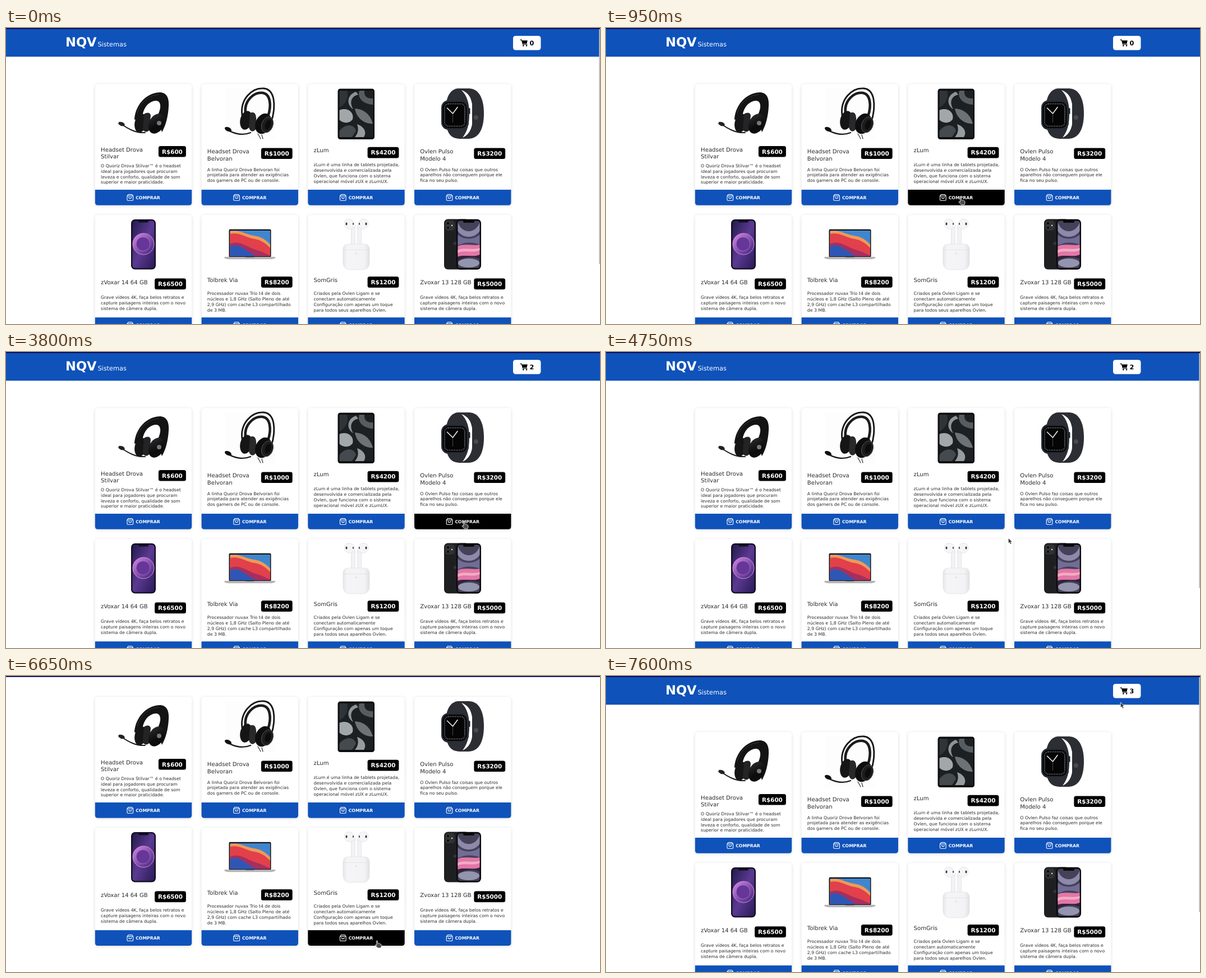
An HTML page that plays this animation: 1059 by 529 pixels, repeating every 8000 ms.

```html
<!DOCTYPE html>
<html lang="pt-BR">
<head>
<meta charset="utf-8">
<title>Loja</title>
<style>
html, body { margin: 0; width: 100%; height: 100%; overflow: hidden; background: #fff; }
svg { display: block; width: 1059px; height: 529px; }
text { font-family: "DejaVu Sans", sans-serif; text-rendering: geometricPrecision; white-space: pre; }
.title { font-size: 10.08px; fill: #2c2c2c; }
.desc { font-size: 7.77px; fill: #2c2c2c; }
.price { font-size: 10.4px; font-weight: bold; fill: #fff; text-anchor: middle; }
.buy { font-size: 7.72px; font-weight: bold; fill: #fff; }
.card { filter: drop-shadow(0 1px 2.5px rgba(0, 0, 0, .15)); }
.line { fill: none; stroke-linecap: round; stroke-linejoin: round; }
</style>
</head>
<body>
<svg viewBox="0 0 1059 529">
  <defs>
    <linearGradient id="violet" x1="0" y1="0" x2="1" y2="1">
      <stop offset="0" stop-color="#241b4c"/><stop offset=".5" stop-color="#5b3a92"/><stop offset="1" stop-color="#2a1a58"/>
    </linearGradient>
    <linearGradient id="orb" x1="0" y1="0" x2="1" y2="1">
      <stop offset="0" stop-color="#d78be6"/><stop offset="1" stop-color="#3b1f78"/>
    </linearGradient>
    <linearGradient id="shell" x1="0" y1="0" x2="1" y2="0">
      <stop offset="0" stop-color="#e6e6ea"/><stop offset=".15" stop-color="#f5f5f7"/><stop offset=".8" stop-color="#f3f3f5"/><stop offset="1" stop-color="#e2e2e6"/>
    </linearGradient>
    <linearGradient id="cup" x1="0" y1="0" x2="1" y2="1">
      <stop offset="0" stop-color="#303032"/><stop offset=".6" stop-color="#0c0c0d"/>
    </linearGradient>
    <clipPath id="tabletScreen"><rect x="594.5" y="112" width="60" height="83"/></clipPath>
    <clipPath id="laptopScreen"><rect x="399.5" y="362" width="71.5" height="46"/></clipPath>
    <clipPath id="phoneScreen"><rect x="805.5" y="344.5" width="39" height="84.5" rx="4"/></clipPath>
  </defs>

  <g id="page">
    <rect y="1" width="1059" height="50.3" fill="#0f52ba"/>
    <g fill="#fff">
      <text x="106" y="32.5" font-size="22.6" font-weight="bold">NQV</text>
      <text x="163.4" y="32.7" font-size="11.3">Sistemas</text>
    </g>
    <rect x="904" y="14" width="49.5" height="25.5" rx="4.5" fill="#fff"/>
    <path d="M917 21.2h2.2l2.4 8h7.2" class="line" stroke="#000" stroke-width="1.2"/>
    <path d="M919.6 22.2h10.2l-1.3 5.6h-7.4z"/>
    <circle cx="922.3" cy="31.5" r="1.3"/><circle cx="928" cy="31.5" r="1.3"/>
    <text id="count" x="933.4" y="31" font-size="11.3" font-weight="bold">0</text>

    <g id="cards"></g>

    <!-- closed headset -->
    <g>
      <path d="M229 164C230 139 249 116 274 115C287 115 291 126 290 140C289 158 285 174 278 186L268 160C277 146 278 131 268 130C254 130 244 144 243 160Z" fill="#141415"/>
      <path d="M234 153C238 135 253 120 272 119" class="line" stroke="#363638" stroke-width="1"/>
      <ellipse cx="240" cy="170" rx="10.5" ry="17" fill="#161617" transform="rotate(12 240 170)"/>
      <path d="M246 154C252 150 258 151 258 157L255 183C250 188 244 185 244 179Z" fill="#242426"/>
      <ellipse cx="268" cy="171" rx="13" ry="18.5" fill="url(#cup)" transform="rotate(26 268 171)"/>
      <circle cx="273" cy="170" r="4" fill="#777"/>
      <path d="M248 187C232 188 219 181 206 172" class="line" stroke="#1a1a1b" stroke-width="2"/>
      <ellipse cx="206" cy="171.5" rx="6" ry="3.4" fill="#222" transform="rotate(20 206 171.5)"/>
    </g>

    <!-- open headset -->
    <g>
      <rect x="390" y="107" width="90" height="92" fill="#fdfdfd"/>
      <path d="M421 156C417 128 438 106 460 108C479 110 482 138 473 168" class="line" stroke="#151516" stroke-width="2.8"/>
      <path d="M427 152C424 130 442 114 458 116C471 118 474 138 467 158" class="line" stroke="#1c1c1e" stroke-width="4.6"/>
      <ellipse cx="428" cy="165" rx="10.5" ry="17" fill="#151516" transform="rotate(12 428 165)"/>
      <path d="M435 152C446 147 448 159 445 181C440 188 434 184 433 177Z" fill="#29292b"/>
      <ellipse cx="459" cy="171" rx="14" ry="19" fill="#0e0e0f" transform="rotate(24 459 171)"/>
      <ellipse cx="466" cy="173" rx="10" ry="14.5" fill="#1d1d1f" stroke="#55555a" stroke-width=".9" transform="rotate(20 466 173)"/>
      <ellipse cx="467" cy="173" rx="5" ry="9" fill="#0c0c0d" transform="rotate(20 467 173)"/>
      <path d="M436 187C422 193 405 189 394 181" class="line" stroke="#1c1c1d" stroke-width="2.4"/>
      <ellipse cx="396" cy="181" rx="6.5" ry="3.6" fill="#111" transform="rotate(27 396 181)"/>
      <path d="M449 189l5 9M456 191l2 7" class="line" stroke="#333" stroke-width="1.2"/>
    </g>

    <!-- tablet -->
    <g>
      <rect x="591.5" y="108.5" width="65.5" height="90.5" rx="4.5" fill="#0c0e10"/>
      <g clip-path="url(#tabletScreen)">
        <path d="M594 112h61v83h-61z" fill="#1c2023"/>
        <path d="M594 112h14C611 123 607 136 594 142Z" fill="#2f3438"/>
        <path d="M624 114C608 119 606 137 619 145C612 133 615 122 628 119Z" fill="#8d9396"/>
        <path d="M630 112C626 124 635 136 655 137V126C643 127 638 121 639 112Z" fill="#565c60"/>
        <path d="M594 147C608 141 621 150 618 163C612 172 600 170 594 164Z" fill="#a2a7aa"/>
        <path d="M622 144C637 145 649 153 654 171C640 172 625 162 622 144Z" fill="#6c7276"/>
        <path d="M594 185C604 170 621 171 624 184L617 195H594Z" fill="#444a4e"/>
        <path d="M626 172C638 176 644 186 638 195H622C628 188 629 181 626 172Z" fill="#979c9f"/>
      </g>
    </g>

    <!-- watch -->
    <g>
      <path d="M785 133C787 121 793 109 806 108H826C846 109 852 131 852 153C852 177 845 197 825 198H808C794 197 789 190 786 179Z" fill="#2d2e34"/>
      <path d="M812 111C824 115 829 124 831 136V172C829 184 823 192 814 196C822 185 826 174 826 153C826 134 822 121 812 111Z" fill="#fff"/>
      <rect x="776" y="129" width="49" height="53" rx="13" fill="#242d38"/>
      <rect x="778.5" y="132" width="43" height="47" rx="10" fill="#050506"/>
      <rect x="782" y="135.5" width="36" height="40" rx="7" fill="none" stroke="#bbb" stroke-width="2" stroke-dasharray=".8 2.2"/>
      <path d="M786.5 143L796.5 153L805 141.5" class="line" stroke="#fff" stroke-width="1.4"/>
      <path d="M796.5 153v16" stroke="#777" stroke-width=".6"/>
      <rect x="824" y="143" width="3.5" height="11" rx="1.5" fill="#1e242c"/>
      <circle cx="838" cy="160" r="4" fill="#484a50"/>
    </g>

    <!-- violet phone -->
    <g>
      <rect x="223" y="342" width="44" height="89.5" rx="7" fill="#110c20"/>
      <rect x="225.3" y="344.3" width="39.4" height="85" rx="5" fill="url(#violet)"/>
      <circle cx="245" cy="386" r="19" fill="url(#orb)" stroke="#d98ee6" stroke-width="1"/>
      <circle cx="244.5" cy="386" r="12.5" fill="#663798" stroke="#b56dd8" stroke-width=".8"/>
      <rect x="236" y="343" width="18" height="4.5" rx="2" fill="#110c20"/>
    </g>

    <!-- laptop -->
    <g>
      <rect x="397.5" y="359.8" width="75" height="50" rx="2" fill="#151517"/>
      <g clip-path="url(#laptopScreen)">
        <path d="M399 361h73v48h-73z" fill="#3f86cf"/>
        <path d="M399 363C417 360 428 369 442 371C456 373 464 379 472 388V409H399Z" fill="#ee9a58"/>
        <path d="M399 368C417 364 428 375 443 377C456 379 464 386 472 394V409H399Z" fill="#e2404a"/>
        <path d="M399 386C417 379 428 391 444 396C456 399 464 404 472 407V409H399Z" fill="#a62f5f"/>
        <path d="M399 390C415 383 426 397 447 409H399Z" fill="#2e57b5"/>
      </g>
      <path d="M389.5 409h90.5v2c-2 2-6 2.2-9 2.2H399c-4 0-8-.3-9.5-2.2z" fill="#b6b3b5"/>
      <rect x="427" y="409" width="15" height="1.4" fill="#858386"/>
    </g>

    <!-- earbuds -->
    <g stroke="#dedee2" stroke-width=".7">
      <path d="M615.5 355h6.8v33h-6.8zM626.7 355h6.8v33h-6.8z" fill="#f2f2f4"/>
      <path d="M622.3 358C623 348 618 340.5 610 341.5C602 342.5 601 353 607 357.5C612 360.5 617 359 619 356Z" fill="#f5f5f7"/>
      <path d="M626.7 358C626 348 631 340.5 639 341.5C647 342.5 648 353 642 357.5C637 360.5 632 359 630 356Z" fill="#f5f5f7"/>
      <path d="M601 397C601 389 604 386 612 386H637C645 386 648 389 648 397V418C648 428 643 432 634 432H615C606 432 601 428 601 418Z" fill="url(#shell)"/>
      <path d="M601.5 396.5h46"/>
      <circle cx="624.5" cy="403" r="1" fill="#d5d5da"/>
      <g fill="#333" stroke="none">
        <ellipse cx="607" cy="350" rx="1.5" ry="2.6"/><ellipse cx="642" cy="350" rx="1.5" ry="2.6"/>
        <ellipse cx="619" cy="350" rx="1" ry="2"/><ellipse cx="630" cy="350" rx="1" ry="2"/>
      </g>
    </g>

    <!-- black phone pair -->
    <g>
      <rect x="781" y="341.5" width="45" height="90" rx="7" fill="#1e1f21"/>
      <rect x="783" y="344" width="17" height="18" rx="5" fill="#303133"/>
      <g fill="#08080a" stroke="#55575a" stroke-width=".7"><circle cx="788" cy="349" r="2.7"/><circle cx="788" cy="357" r="2.7"/></g>
      <circle cx="795" cy="353" r="1.3" fill="#ddd"/>
      <circle cx="800.5" cy="385" r="2.7" fill="#33353a"/>
      <rect x="803" y="341.8" width="44" height="90" rx="7" fill="#09090b"/>
      <g clip-path="url(#phoneScreen)">
        <path d="M805 344h40v86h-40z" fill="#454158"/>
        <path d="M805 346C812 369 838 369 845 346V362C836 377 814 377 805 362Z" fill="#8d89ab"/>
        <path d="M805 369C815 379 835 379 845 369V387C833 382 817 382 805 389Z" fill="#716d96"/>
        <path d="M805 390C817 384 833 390 845 387V405C833 411 817 404 805 409Z" fill="#e277a7"/>
        <path d="M805 397C817 391 833 398 845 393V397C833 403 817 396 805 402Z" fill="#f3abc5"/>
        <path d="M805 409C818 404 833 411 845 405V413C832 407 817 409 805 417Z" fill="#35213b"/>
        <ellipse cx="825" cy="420" rx="19" ry="8" fill="#9395ae"/>
      </g>
      <rect x="815" y="343.5" width="20" height="4.5" rx="2" fill="#09090b"/>
    </g>
  </g>

  <rect width="1059" height="1.8" fill="#08084f"/>
  <rect id="strip" x="413" width="234" height="1.9" fill="#555"/>
  <rect id="bar" x="1057.3" y="2" width="1.7" height="420" fill="#bdbdc1"/>
  <g stroke="#fff" stroke-width=".8" stroke-linejoin="round">
    <path id="arrow" d="M0 0V9.6L2.2 7.7L3.9 11.2L5.9 10.2L4.3 6.9H7.2Z" fill="#3a3a3a"/>
    <path id="hand" d="M-.9 .8C-.9 -.3 .9 -.3 1 .8L1.6 4.9C2.4 4.2 3.4 4.4 3.8 5.2C4.7 4.7 5.6 5 5.9 5.9C6.9 5.6 7.6 6.1 7.7 7.1L8 10.2L6.8 12.9H1.4L-2.8 8.5C-3.5 7.5 -2.4 6.7 -1.5 7.4L-.3 8.3Z" fill="#4a4a4a"/>
  </g>
</svg>
<script>
const NS = "http://www.w3.org/2000/svg";
const BLUE = "#0f52ba";
const $ = id => document.getElementById(id);

function add(parent, tag, attrs, content) {
  const el = document.createElementNS(NS, tag);
  for (const key in attrs) el.setAttribute(key, attrs[key]);
  if (content !== undefined) el.textContent = content;
  parent.append(el);
  return el;
}

// title, title baseline, price, badge top, description, description baseline
const products = [
  ["Headset Drova|Stilvar", 220.8, "R$600", 211,
    "O Quoriz Drova Stilvar™ é o headset|ideal para jogadores que procuram|leveza e conforto, qualidade de som|superior e maior praticidade.", 248.8],
  ["Headset Drova|Belvoran", 224.2, "R$1000", 214.5,
    "A linha Quoriz Drova Belvoran foi|projetada para atender as exigências|dos gamers de PC ou de console.", 255.6],
  ["zLum", 222.4, "R$4200", 212.8,
    "zLum é uma linha de tablets projetada,|desenvolvida e comercializada pela|Ovlen, que funciona com o sistema|operacional móvel zUX e zLumUX.", 247.1],
  ["Ovlen Pulso|Modelo 4", 224.2, "R$3200", 214.5,
    "O Ovlen Pulso faz coisas que outros|aparelhos não conseguem porque ele|fica no seu pulso.", 255.6],
  ["zVoxar 14 64 GB", 457.6, "R$6500", 447.6,
    "Grave vídeos 4K, faça belos retratos e|capture paisagens inteiras com o novo|sistema de câmera dupla.", 484],
  ["Tolbrek Via", 454.1, "R$8200", 444.3,
    "Processador nuvax Trio t4 de dois|núcleos e 1,8 GHz (Salto Pleno de até|2,9 GHz) com cache L3 compartilhado|de 3 MB.", 477.4],
  ["SomGris", 454.1, "R$1200", 444.3,
    "Criados pela Ovlen Ligam e se|conectam automaticamente|Configuração com apenas um toque|para todos seus aparelhos Ovlen.", 477.4],
  ["Zvoxar 13 128 GB", 457.6, "R$5000", 447.6,
    "Grave vídeos 4K, faça belos retratos e|capture paisagens inteiras com o novo|sistema de câmera dupla.", 484]
];

function lines(parent, text, cls, x, y, gap) {
  text.split("|").forEach((line, i) => add(parent, "text", { class: cls, x, y: y + i * gap }, line));
}

const buttons = products.map(([title, titleY, price, badgeY, desc, descY], i) => {
  const top = i < 4 ? 100.3 : 334;
  const buyY = i < 4 ? 289 : 517.3;
  const g = add($("cards"), "g", { transform: `translate(${158.8 + (i % 4) * 189.75} 0)` });
  add(g, "rect", { class: "card", y: top, width: 172.4, height: buyY + 27.8 - top, rx: 5, fill: "#fff" });
  lines(g, title, "title", 10.3, titleY, 12.3);
  lines(g, desc, "desc", 10.3, descY, 9.85);
  const width = price.length < 6 ? 49 : 55.8;
  add(g, "rect", { x: 162.1 - width, y: badgeY, width, height: 19.6, rx: 3.5 });
  add(g, "text", { class: "price", x: 162.1 - width / 2, y: badgeY + 13.6 }, price);
  const button = add(g, "path", { d: `M0 ${buyY}h172.4v22.8q0 5-5 5H5q-5 0-5-5z`, fill: BLUE });
  add(g, "path", {
    class: "line", stroke: "#fff", "stroke-width": 1.1,
    d: `M59.2 ${buyY + 8.6}h6.6l2 2.6v6.8q0 1.2-1.2 1.2h-8.2q-1.2 0-1.2-1.2v-6.8zM57.2 ${buyY + 11.2}h10.6M60.2 ${buyY + 13.2}q0 2.3 2.3 2.3t2.3-2.3`
  });
  add(g, "text", { class: "buy", x: 72.4, y: buyY + 16.7 }, "COMPRAR");
  return button;
});

// start, scroll, cart count, scrollbar, hovered button, pointer, x, y
const steps = [
  [0, 0, 0, 1, -1, "", 0, 0],
  [950, 0, 0, 0, 2, "hand", 632, 303],
  [1900, 0, 1, 0, 2, "hand", 632, 303],
  [2850, 0, 1, 1, -1, "arrow", 714, 324],
  [3800, 0, 2, 0, 3, "hand", 816, 303],
  [4750, 0, 2, 1, -1, "arrow", 717.2, 332.5],
  [5700, 63, 2, 1, -1, "arrow", 717.2, 334.3],
  [6650, 63, 3, 0, 6, "hand", 661.3, 473.2],
  [7600, 0, 3, 1, -1, "arrow", 917.2, 47]
];

const show = (id, on) => $(id).setAttribute("visibility", on ? "visible" : "hidden");
let shown;

function draw(now) {
  const t = now % 8000;
  const step = steps.findLast(s => s[0] <= t);
  if (step !== shown) {
    shown = step;
    const [, scroll, count, bar, hover, pointer, x, y] = step;
    $("page").setAttribute("transform", `translate(0 ${-scroll})`);
    $("count").textContent = count;
    $("bar").setAttribute("y", 2 + scroll * 0.86);
    show("bar", bar);
    show("strip", scroll && bar);
    buttons.forEach((b, i) => b.setAttribute("fill", i === hover ? "#000" : BLUE));
    for (const id of ["arrow", "hand"]) {
      show(id, id === pointer);
      $(id).setAttribute("transform", `translate(${x} ${y})`);
    }
  }
}

const start = performance.now();
function tick() {
  draw(performance.now() - start);
  requestAnimationFrame(tick);
}
tick();
</script>
</body>
</html>
```
